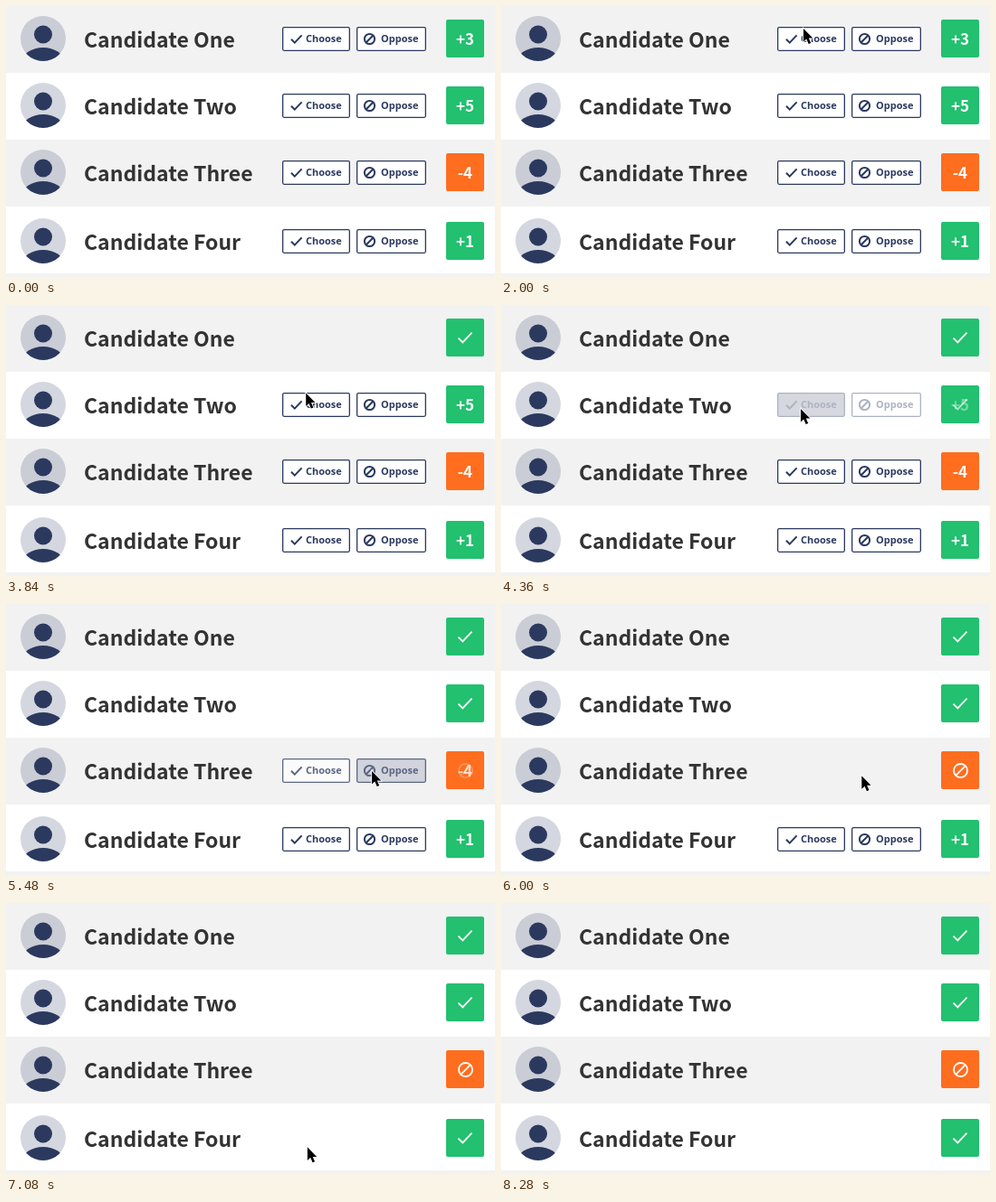
An HTML page for the animation above (8960 ms loop, 540 by 300 pixels).

```html
<!DOCTYPE html>
<html lang="en">
<head>
<meta charset="utf-8">
<title>Candidate list</title>
<style>
  html, body { margin: 0; width: 100%; height: 100%; overflow: hidden; background: #fff; }
  svg { display: block; width: 540px; height: 300px; }
  text { font: bold 23px "Noto Sans CJK SC", "Noto Sans CJK JP", "Noto Sans CJK", sans-serif; fill: #333; }
  .label { font: bold 11px "Open Sans", "Noto Sans", sans-serif; fill: #2b395f; }
  .score { font-size: 17px; fill: #fff; text-anchor: middle; }
  .navy { fill: #2b395f; }
  .line { fill: none; stroke: #2b395f; stroke-width: 2; }
  .mark { fill: none; stroke: #fff; stroke-width: 1.8; }
  .frame { fill: none; stroke: #2b395f; stroke-width: 1.3; }
</style>
</head>
<body>
<svg viewBox="0 0 540 300">
  <defs>
    <clipPath id="disc"><circle cx="41" cy="36" r="25"/></clipPath>
    <g id="avatar">
      <circle cx="41" cy="36" r="25" class="navy" opacity=".2"/>
      <circle cx="41" cy="31.5" r="10" class="navy"/>
      <ellipse cx="41" cy="61" rx="23" ry="15" class="navy" clip-path="url(#disc)"/>
    </g>
  </defs>
  <path d="M0 0H540V74H0ZM0 148H540V222H0ZM0 296H540V300H0Z" fill="#f2f2f2"/>
  <g id="rows"></g>
  <path id="cursor" d="M0 0V14.6L3.3 11.5L5.7 17L8.2 15.9L5.8 10.6H10.3Z"
    stroke="#fff" stroke-width="1.6" paint-order="stroke"/>
</svg>
<script>
const LOOP = 8960, STEP = 40, FADE = 250;
const rows = [
  { y: 0, name: 'Candidate One', score: '+3', click: 2835 },
  { y: 74, name: 'Candidate Two', score: '+5', click: 4205 },
  { y: 148, name: 'Candidate Three', score: '-4', click: 5418, oppose: true },
  { y: 224, name: 'Candidate Four', score: '+1', click: 6770 },
];

const clamp = v => Math.min(1, Math.max(0, v));
const smooth = p => p * p * (3 - 2 * p);
const easeOut = p => 1 - (1 - p) ** 2;
const easeIn = p => p * p;
const linear = p => p;

// Each move: start, end, from x, y, to x, y, easing.
const moves = [
  [1640, 2000, 355, 1, 334, 25, easeOut],
  [2000, 2440, 334, 25, 332, 31, easeOut],
  [3360, 4040, 332, 31, 331, 115, smooth],
  [4680, 5240, 331, 115, 404, 185, smooth],
  [5880, 6600, 404, 185, 327, 255, smooth],
  [6920, 7200, 327, 255, 345, 302, easeIn],
  [8160, 8200, 535, 15, 523, 9, linear],
  [8200, 8280, 523, 9, 545, -5, linear],
];

const tick = (d, cls) => `<path d="${d}" class="${cls}"/>`;
const ban = (x, y, r, cls) => {
  const k = r * Math.SQRT1_2;
  return `<circle cx="${x}" cy="${y}" r="${r}" class="${cls}"/>` +
    `<path d="M${x - k} ${y + k}L${x + k} ${y - k}" class="${cls}"/>`;
};
const button = (x, width, label, labelX, icon, pressed) => {
  const box = `x="${x + .65}" y="23.65" width="${width - 1.3}" height="25.7" rx="1.5"`;
  return `<rect ${box} fill="#fff"/>
    ${pressed ? `<rect ${box} class="navy press" opacity="0"/>` : ''}
    <rect ${box} class="frame"/>${icon}
    <text x="${labelX}" y="40" class="label">${label}</text>`;
};

document.getElementById('rows').innerHTML = rows.map(({ y, name, score, oppose }) => `
  <g transform="translate(0 ${y})">
    <use href="#avatar"/>
    <text x="86" y="46">${name}</text>
    <g class="buttons">
      ${button(305, 75, 'Choose', 331, tick('M315 36.8L318.8 40.6L326.6 32.4', 'line'), !oppose)}
      ${button(387, 77, 'Oppose', 414, ban(401.5, 36.5, 5.6, 'line'), oppose)}
    </g>
    <rect x="486" y="15" width="42" height="42" rx="2" fill="${oppose ? '#ff6d1f' : '#22c06f'}"/>
    <text x="507" y="42.5" class="score">${score}</text>
    <g class="done">${oppose ? ban(507.5, 36.5, 7.5, 'mark')
      : tick('M499.5 36.7L504.3 41.4L514.5 30.6', 'mark')}</g>
  </g>`).join('');

[...document.getElementById('rows').children].forEach((group, i) => {
  for (const part of ['buttons', 'press', 'score', 'done'])
    rows[i][part + 'El'] = group.querySelector('.' + part);
});
const cursor = document.getElementById('cursor');

function draw(now) {
  const t = Math.floor(now % LOOP / STEP) * STEP;
  for (const row of rows) {
    const p = clamp((t - row.click) / FADE);
    row.buttonsEl.setAttribute('opacity', 1 - p);
    row.pressEl.setAttribute('opacity', .7 * p ** .7);
    row.scoreEl.setAttribute('opacity', 1 - p);
    row.doneEl.setAttribute('opacity', p);
  }
  const move = moves.filter(m => m[0] <= t).pop();
  const visible = move && !(t >= 7200 && t < 8160) && t < 8280;
  cursor.setAttribute('visibility', visible ? 'visible' : 'hidden');
  if (visible) {
    const [start, end, x0, y0, x1, y1, ease] = move;
    const p = ease(clamp((t - start) / (end - start)));
    cursor.setAttribute('transform', `translate(${x0 + (x1 - x0) * p} ${y0 + (y1 - y0) * p})`);
  }
}

let begin;
function loop(now) {
  begin ??= now;
  draw(now - begin);
  requestAnimationFrame(loop);
}
draw(0);
requestAnimationFrame(loop);
</script>
</body>
</html>
```
